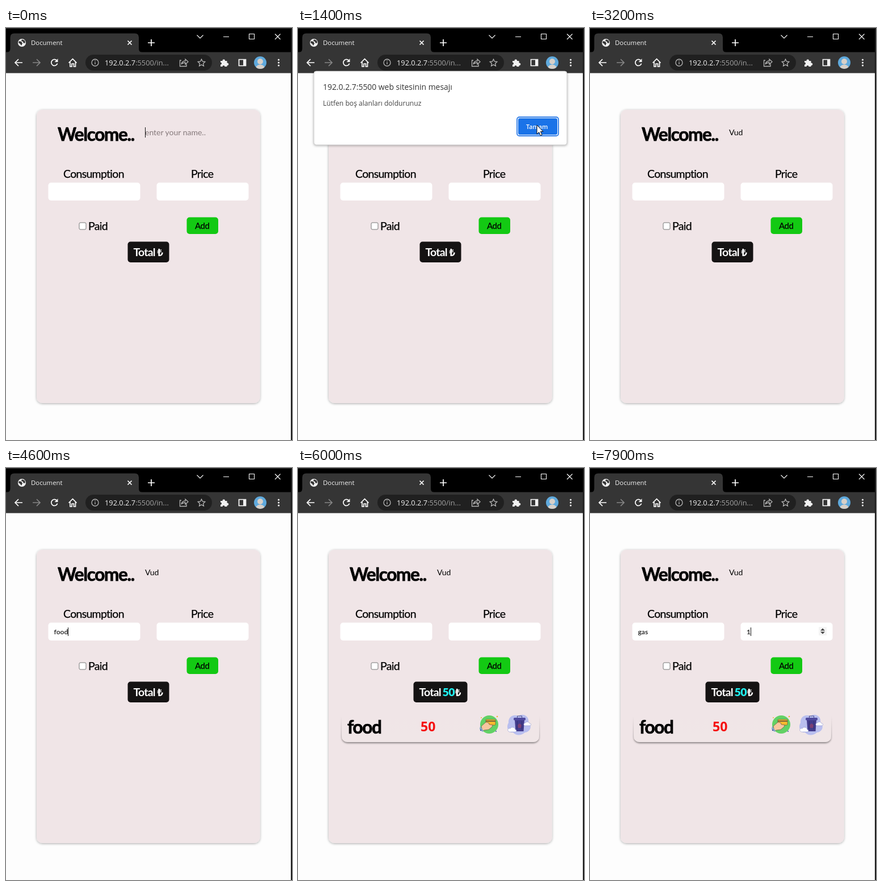
Recreate the animation shown at these times as an HTML page. Size 504 px wide and 726 px high, loop 8000 ms.

```html
<!DOCTYPE html>
<html lang="en">
<head>
<meta charset="utf-8">
<title>Expense list</title>
<style>
  html, body { margin: 0; width: 100%; height: 100%; overflow: hidden; background: #fdfdfd; }
  svg { display: block; width: 100%; height: 100%; }
  text { white-space: pre; }
  .ui { font-family: "Open Sans", "Noto Sans", sans-serif; }
  .form { font-family: Lato, "Noto Sans", sans-serif; }
  .label { font-size: 19.5px; letter-spacing: -.7px; stroke: #000; stroke-width: .25px; }
  .title { font-size: 31.5px; font-weight: 700; letter-spacing: -1.35px; stroke: #000; stroke-width: .7px; }
  .total { font-size: 19.5px; font-weight: 700; letter-spacing: -.8px; fill: #fff; }
  .sum { font-size: 19.5px; font-weight: 900; letter-spacing: -.6px; fill: #1ff0f0; }
  .lira { font: 700 18.5px "Noto Sans", "DejaVu Sans", sans-serif; fill: #fff; }
  .field { font-size: 12px; font-weight: 700; fill: #333; }
  .line { fill: none; stroke: #fff; stroke-width: 1.7; }
  .thin { fill: none; stroke: #fff; stroke-width: 1.1; }
  .dim { fill: none; stroke: #b5b5b5; stroke-width: 1.3; }
</style>
</head>
<body>
<svg viewBox="0 0 504 726" preserveAspectRatio="none">
  <defs>
    <filter id="soft" x="-10%" y="-10%" width="120%" height="125%">
      <feDropShadow dx="0" dy="1" stdDeviation="2" flood-color="#000" flood-opacity=".33"/>
    </filter>
    <filter id="lift" x="-10%" y="-20%" width="120%" height="150%">
      <feDropShadow dx="0" dy="2" stdDeviation="1.5" flood-color="#000" flood-opacity=".42"/>
    </filter>
    <linearGradient id="fade" x2="0" y2="1">
      <stop offset=".3" stop-color="#f0e5e7"/>
      <stop offset="1" stop-color="#f0e5e7" stop-opacity="0"/>
    </linearGradient>
    <clipPath id="face"><circle cx="448" cy="61" r="11"/></clipPath>
  </defs>

  <!-- page -->
  <rect width="504" height="726" fill="#fdfdfd"/>
  <rect x="54" y="144" width="393.500" height="517" rx="10" fill="#f0e5e7" filter="url(#soft)"/>
  <g class="form">
    <text class="title" x="91" y="198.500">Welcome..</text>
    <text id="hint" x="245" y="189" font-size="14" fill="#85797b">enter your name..</text>
    <text id="name" x="245" y="189" font-size="14"></text>
    <text class="label" x="101" y="263.5">Consumption</text>
    <text class="label" x="326" y="263.5">Price</text>
    <rect x="74.500" y="272.500" width="162" height="31.500" rx="5" fill="#fff"/>
    <rect x="265.500" y="272.500" width="162" height="31.500" rx="5" fill="#fff"/>
    <text id="item" class="field" x="84.500" y="293"></text>
    <text id="price" class="field" x="276" y="293"></text>
    <g id="spin">
      <rect x="403" y="280" width="14" height="15" fill="#f4f4f4"/>
      <path d="M406 286.500l4-4 4 4zM406 288.500l4 4 4-4z" fill="#444"/>
    </g>
    <rect x="129" y="343" width="12" height="12" rx="2" fill="#fff" stroke="#767676"/>
    <text class="label" x="145" y="355.500">Paid</text>
    <rect x="318.500" y="333.500" width="55.500" height="29.500" rx="5" fill="#13c913"/>
    <text x="333" y="354" font-size="15" letter-spacing="-.4" stroke="#000" stroke-width=".25">Add</text>
    <g id="empty">
      <rect x="214.500" y="376.500" width="73" height="36.500" rx="5" fill="#151313"/>
      <text class="total" x="224.500" y="402">Total</text>
      <text class="lira" x="266.500" y="402">₺</text>
    </g>
    <g id="filled">
      <rect x="203.500" y="376.500" width="95" height="36.500" rx="5" fill="#151313"/>
      <text class="total" x="213.500" y="402">Total</text>
      <text class="sum" x="254.500" y="402">50</text>
      <text class="lira" x="277" y="402">₺</text>
      <path d="M77 430H425V473a10 10 0 0 1-10 10H87a10 10 0 0 1-10-10z" fill="#f0e6e7" filter="url(#lift)"/>
      <rect x="70" y="422" width="362" height="50" fill="url(#fade)"/>
      <text class="title" x="87" y="468">food</text>
      <text class="ui" x="216" y="464" font-size="23" font-weight="700" fill="#f50f0f">50</text>
      <!-- pay -->
      <circle cx="337" cy="452" r="16" fill="#62d165"/>
      <g stroke="#5b4a3c" stroke-width=".6">
        <rect x="331" y="443" width="17" height="10" rx="1.500" fill="#f7b92f"/>
        <path d="M331 446h17" stroke-width="1.600"/>
        <path d="M323 455l8-7 5 1 1 3 6 1-1 3-6 5-8 1-3 2z" fill="#f7c79f"/>
      </g>
      <path d="M321 455l6 8-2 2-5-5z" fill="#7fa8c9"/>
      <g fill="#f0b43a"><circle cx="351" cy="438" r="1.300"/><circle cx="323" cy="440" r="1"/></g>
      <g fill="#4457a0"><circle cx="322" cy="462" r="1.200"/><circle cx="349" cy="464" r="1"/></g>
      <!-- delete -->
      <path d="M371 449c-1-11 9-16 17-12 9-6 20 1 18 11 7 6 4 17-6 18-8 7-17 5-21 0-8 1-13-9-8-17z" fill="#b9bfef"/>
      <path d="M382 444h17l-1.500 20h-14z" fill="#433c8c"/>
      <rect x="380" y="440" width="21" height="4.500" rx="1.500" fill="#4f4a9e"/>
      <path d="M386.500 440v-3h8v3M386.500 446v15M394.500 446v15" fill="none" stroke="#2f2f6e" stroke-width=".8"/>
      <path d="M387 453l3.500-3 3.500 3-1 5h-5z" fill="#7c3f73"/>
      <path d="M370 463a3 3 0 0 1 4-4 5 5 0 0 1 9 2 2 2 0 0 1 0 4h-11zM398 453a3 3 0 0 1 3-4 4 4 0 0 1 7 1 2 2 0 0 1 1 4h-10z" fill="#fff" stroke="#8087c4" stroke-width=".5"/>
    </g>
  </g>
  <rect id="caret" width="1" fill="#111"/>

  <!-- browser -->
  <rect width="504" height="43" fill="#000"/>
  <path d="M0 .5H504" stroke="#383838"/>
  <path d="M0 42.500H504V79.500H0z" fill="#353535"/>
  <path d="M1.500 43q6 0 6-7V16.500q0-7 7-7H227q7 0 7 7V36q0 7 6 7z" fill="#353535"/>
  <g class="ui" fill="#f1f1f1">
    <circle cx="28" cy="26" r="7"/>
    <path d="M23 23l4 1 2 3-2 4-2-3-3-2zM28 20l5 2 1 4-3 1-1-3-3-1z" fill="#353535"/>
    <text x="44" y="30" font-size="11.400">Document</text>
    <path class="line" d="M214.500 22.500l7 7m0-7l-7 7M256 20v12M250 26h12"/>
    <path class="thin" d="M336.500 12.500l5.500 5.500 5.500-5.500M383 15.500h10M428.500 10.500h9v9h-9z"/>
    <path class="thin" d="M474 10.500l9.500 9.500m0-9.500l-9.500 9.500" stroke-width="1.300"/>
    <path class="line" d="M29 61H16M22 55l-6 6 6 6"/>
    <path class="line" d="M47 61H60M54 55l6 6-6 6" style="stroke:#858585"/>
    <path class="line" d="M90 58a5.500 5.500 0 1 0 .6 4.500"/>
    <path d="M91.500 54v6h-6z"/>
    <path class="line" d="M110.500 61.500l7-7 7 7M113 60v8h3v-5h3.500v5h3v-8"/>
    <rect x="140" y="47" width="223" height="28" rx="14" fill="#202020"/>
    <circle class="dim" cx="157" cy="61" r="6"/>
    <path class="dim" d="M157 60v4M157 57v1.500"/>
    <text x="174" y="66" font-size="12.800">192.0.2.7<tspan fill="#a2a2a2">:5500/in...</tspan></text>
    <path class="dim" d="M309 57h-2.500v10.500h11.500v-4M309 64q1-6 7-6v-3l5 4.500-5 4.500v-3q-5 0-7 3z"/>
    <path class="dim" d="M344.500 55l1.900 4 4.400.5-3.200 3 .8 4.400-3.900-2.200-3.900 2.200.8-4.400-3.200-3 4.400-.5z"/>
    <path d="M378 58h3.500a2.300 2.300 0 1 1 4.500 0h3.500v3.500a2.300 2.300 0 1 1 0 4.500v2h-4a2 2 0 0 0-4 0h-3.500v-3.500a2 2 0 0 0 0-4z"/>
    <path class="line" d="M410.500 55.500h12v11h-12z"/>
    <path d="M418 55h5v12h-5z"/>
    <g clip-path="url(#face)">
      <rect x="437" y="50" width="22" height="22" fill="#5fa9dc"/>
      <circle cx="448" cy="59" r="5" fill="#d8d0c8"/>
      <ellipse cx="448" cy="71" rx="8" ry="6.500" fill="#d8d0c8"/>
    </g>
    <circle cx="480.500" cy="56" r="1.600"/><circle cx="480.500" cy="61" r="1.600"/><circle cx="480.500" cy="66" r="1.600"/>
  </g>
  <rect x="502" width="2" height="726" fill="#1a1a1a"/>

  <g id="dialog" class="ui">
    <rect x="28" y="76" width="446" height="130" rx="4" fill="#fff" filter="url(#soft)" stroke="#b5b5b5" stroke-width=".7"/>
    <text x="44" y="108.500" font-size="13.900" fill="#333">192.0.2.7:5500 web sitesinin mesajı</text>
    <text x="44" y="136.500" font-size="12.100" fill="#444">Lütfen boş alanları doldurunuz</text>
    <rect x="386" y="157" width="73" height="33" rx="4" fill="#fff" stroke="#2f7de8" stroke-width="1.800"/>
    <rect x="388" y="159" width="69" height="29" rx="3" fill="#1a73e8"/>
    <text x="402" y="178" font-size="10.800" font-weight="600" fill="#fff">Tamam</text>
  </g>

  <g id="cursor" fill="#fff" stroke="#111" stroke-width="1" stroke-linejoin="round">
    <path id="arrow" d="M0 0V16l3.700-3.500L6.300 18.500l2.700-1.200-2.600-5.800H11z"/>
    <path id="hand" d="M-1.800 1.500q1.800-3 3.600 0V8q1.500-1.500 3 .3 1.500-1 2.700.6 2.400-.8 2.500 2V15q0 3-2 7H0q-1-3-4-6.500L-6.500 12q1-2.500 4.700.8z"/>
    <path id="beam" d="M-3-8q3 0 3 2V6q0 2-3 2M3-8q-3 0-3 2M0 6q0 2 3 2" fill="none"/>
  </g>
</svg>
<script>
const LOOP = 8000, TICK = 100;
const $ = id => document.getElementById(id);
const show = (id, on) => $(id).setAttribute("visibility", on ? "visible" : "hidden");

// Each entry: [start time, value held from then on]
const typed = {
  name: [[0, ""], [2600, "V"], [2800, "Vu"], [2900, "Vud"]],
  item: [[0, ""], [4000, "f"], [4300, "fo"], [4600, "food"], [5700, ""],
         [6500, "g"], [6700, "ga"], [7000, "gas"]],
  price: [[0, ""], [5100, "5"], [5400, "50"], [5700, ""], [7800, "1"]]
};
const focus = [[0, "name"], [200, ""], [2200, "name"], [3200, ""], [3300, "item"],
               [4900, "price"], [5700, ""], [6300, "item"], [7300, "price"]];
// Pointer: [time, x, y]
const path = [[200, 386, 503], [600, 357, 354], [900, 357, 354], [1200, 408, 198],
              [1400, 421, 171], [1600, 421, 171], [1700, 405, 184], [1800, 359, 218],
              [2100, 300, 185], [2600, 300, 185]];

function held(list, t) {
  let value = list[0][1];
  for (const [start, v] of list) if (t >= start) value = v;
  return value;
}

function along(keys, t) {
  const i = keys.findIndex((k, n) => n && t <= k[0]);
  const [t0, x0, y0] = keys[i - 1], [t1, x1, y1] = keys[i];
  const p = (t - t0) / (t1 - t0);
  return [x0 + (x1 - x0) * p, y0 + (y1 - y0) * p];
}

function drawCaret(target) {
  show("caret", target);
  if (!target) return;
  const field = $(target), isName = target === "name";
  const left = +field.getAttribute("x");
  const width = field.textContent ? field.getComputedTextLength() : 0;
  $("caret").setAttribute("x", Math.round(left + width));
  $("caret").setAttribute("y", isName ? 175 : 281);
  $("caret").setAttribute("height", isName ? 18 : 15);
}

function drawPointer(t, dialogOpen) {
  const on = t >= 200 && t < 2600;
  let kind = "";
  if (on) {
    const [x, y] = along(path, t);
    $("cursor").setAttribute("transform", `translate(${x} ${y})`);
    const overAdd = x > 318 && x < 374 && y > 333 && y < 363;
    const overName = !dialogOpen && x > 240 && x < 400 && y > 172 && y < 198;
    kind = overAdd ? "hand" : overName ? "beam" : "arrow";
  }
  for (const k of ["arrow", "hand", "beam"]) show(k, k === kind);
}

function draw(ms) {
  const t = Math.floor(ms / TICK) * TICK;
  for (const id in typed) $(id).textContent = held(typed[id], t);
  show("hint", t < 2600);

  const target = held(focus, t);
  drawCaret(target);
  show("spin", target === "price");

  const added = t >= 5700;
  show("empty", !added);
  show("filled", added);

  const open = t >= 900 && t < 1700, settling = t < 1000;
  show("dialog", open);
  $("dialog").setAttribute("transform", `translate(0 ${settling ? -5.5 : 0})`);
  $("dialog").setAttribute("opacity", settling ? 0.95 : 1);

  drawPointer(t, open);
}

const began = performance.now();
function frame() {
  draw((performance.now() - began) % LOOP);
  requestAnimationFrame(frame);
}
frame();
</script>
</body>
</html>
```
